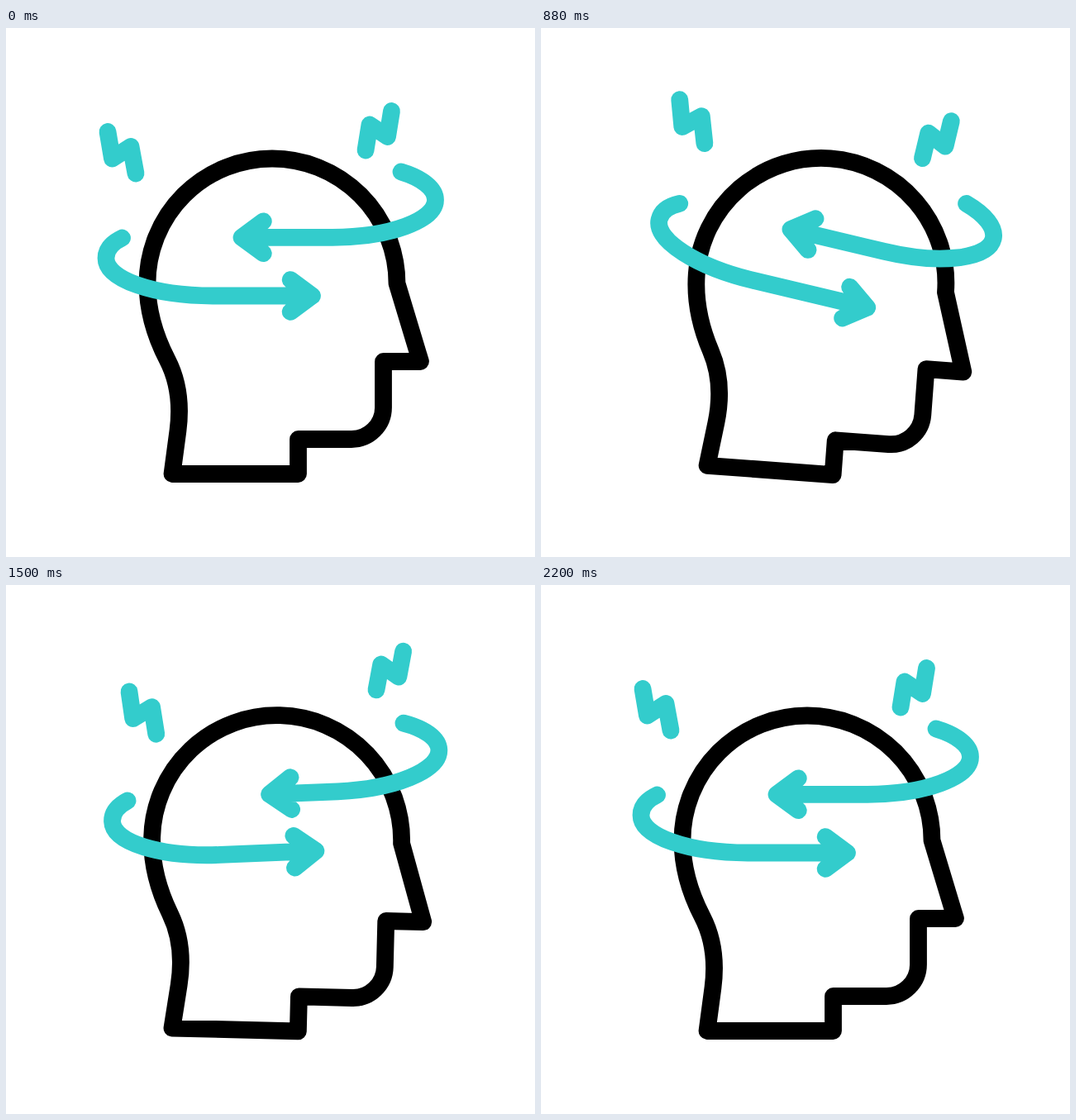
Recreate the animation shown at these times as an HTML page. Size 640x640 px, loop 2.4 s.

```html
<!DOCTYPE html>
<html lang="en">
<head>
<meta charset="utf-8">
<title>Dizzy head</title>
<style>
  html, body { margin: 0; width: 100%; height: 100%; overflow: hidden; background: #fff; }
  svg { display: block; width: 100vw; height: 100vh; }
  path { fill: none; stroke-width: 20.8; stroke-linecap: round; stroke-linejoin: round; }
  .skull { stroke: #000; }
  .accent { stroke: #33cccc; }
</style>
</head>
<body>
<svg viewBox="0 0 640 640">
  <g id="head">
    <path class="skull" d="M201 539.5H353.5V497.5H418A38.5 38.5 0 0 0 456.5 459V403.5H501.5L473 309
      A151 151 0 0 0 171 309C171 341 180 372 195 401C208 426 212 456 208 487Z"/>
    <g class="accent">
      <path id="boltL" d="M123 125.5L128.5 158L151 143.5L157 176"/>
      <path id="boltR" d="M466.5 100.5L461.5 131.5L440 117L435 148"/>
      <g id="arrows">
        <path id="arrowL"/>
        <path id="arrowR"/>
      </g>
    </g>
  </g>
</svg>
<script>
  const LOOP = 2400, HOLD = 200, MOVE = 2000, STEP = 20;
  const part = id => document.getElementById(id);

  // Eased value of a track: key times and matching values
  function track(u, times, values) {
    let i = 1;
    while (i < times.length - 1 && u > times[i]) i++;
    const s = (u - times[i - 1]) / (times[i] - times[i - 1]);
    const k = s * s * (3 - 2 * s);
    return values[i - 1] + k * (values[i] - values[i - 1]);
  }

  const QUARTERS = [0, .25, .5, .75, 1];
  const FIFTHS = [0, .2, .4, .6, .8, 1];
  const SWAY = [0, .305, .55, .83, 1];
  const SLIDE = [0, .17, .515, .72, .89, 1];

  function rotate(id, angle, x, y) {
    part(id).setAttribute('transform', `rotate(${angle} ${x} ${y})`);
  }

  // A bolt swings between two offsets a and b
  function jump(id, u, a, b) {
    const at = n => track(u, FIFTHS, [0, a[n], b[n], a[n], b[n], 0]);
    part(id).setAttribute('transform', `translate(${at(0)} ${at(1)})`);
  }

  // Curved tail, straight shaft up to the tip, then the chevron
  function arrow(id, tail, tip, y, dir) {
    const back = tip - dir * 26.3;
    part(id).setAttribute('d',
      `${tail}H${tip}M${back} ${y - 19.4}L${tip} ${y}L${back} ${y + 19.4}`);
  }

  function draw(u) {
    rotate('head', track(u, QUARTERS, [0, 9, -7, 6, 0]), 338, 535);
    rotate('arrows', track(u, SWAY, [0, 10.15, -8.8, 8.4, 0]), 319, 263);
    jump('boltL', u, [17, 16.5], [10.4, -36.3]);
    jump('boltR', u, [4, -30], [-3.7, 10.2]);
    arrow('arrowL', 'M140.5 254C127 260.5 121 269 121 278.5C121 304 178 324 250 324',
      370.5 + track(u, SLIDE, [0, -50, 93, -41, 16, 0]), 324, 1);
    arrow('arrowR', 'M478 174C503 181.5 519.5 194 519.5 208C519.5 233 464 253.3 395 253.3',
      285 - track(u, SLIDE, [0, -74, 91, -71, 20, 0]), 253.3, -1);
  }

  function frame() {
    const t = Math.floor(performance.now() % LOOP / STEP) * STEP;
    draw(Math.min(1, Math.max(0, (t - HOLD) / MOVE)));
    requestAnimationFrame(frame);
  }
  frame();
</script>
</body>
</html>
```
